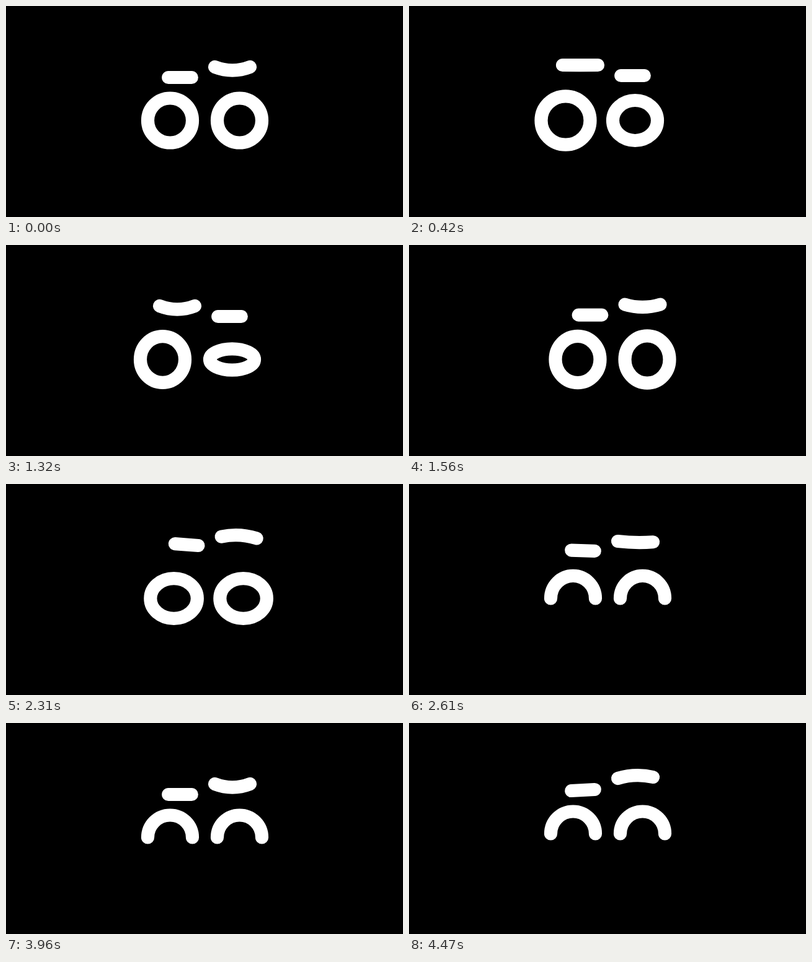
Animation, 640 px wide and 341 px high, one loop 4.5 s. Source, as an HTML page with a canvas:

```html
<!DOCTYPE html>
<html lang="en">
<head>
<meta charset="utf-8">
<title>Eyes</title>
<style>
  html, body { margin: 0; width: 100%; height: 100%; overflow: hidden; background: #000; }
  canvas { display: block; }
</style>
</head>
<body>
<canvas id="stage" width="640" height="341"></canvas>
<script>
const ctx = document.getElementById('stage').getContext('2d');
const LOOP = 4500, STEP = 30;
const RADIUS = 36;
const LOOK_LEFT = 255, LOOK_RIGHT = 1375, SMILE = 2400;
const LAG = 55; // the trailing eye blinks a little later

const mix = (a, b, k) => a + (b - a) * k;

// Eased 0 to 1 between two times
function ramp(t, from, to) {
  const u = Math.min(1, Math.max(0, (t - from) / (to - from)));
  return u * u * (3 - 2 * u);
}

const bump = (t, from, peak, to) => ramp(t, from, peak) * (1 - ramp(t, peak, to));

// Change in eye height: stretch, close, open, overshoot
function blink(t, shut) {
  const d = t - shut;
  return 2 * bump(d, -180, -110, -40)
    - 34 * bump(d, -120, 0, 150)
    + 3.5 * bump(d, 40, 150, 230);
}

function drawEye(x, y, rx, ry, smiling) {
  ctx.beginPath();
  ctx.ellipse(x, y, rx, ry, 0, smiling ? Math.PI : 0, Math.PI * 2);
  ctx.stroke();
}

function drawEyes(t, rise) {
  const x = -12 * ramp(t, 240, 390) + 19.5 * ramp(t, 1330, 1500) - 7.5 * ramp(t, 2260, 2440);
  const y = 185 - 6 * rise;
  const puff = 2 * bump(t, 30, 150, 270) + 5 * bump(t, 2250, SMILE, 2580);
  const leftPuff = 3.5 * bump(t, 290, 420, 560);
  const height = (left, right) =>
    RADIUS + blink(t, left) + blink(t, right) + blink(t, SMILE);
  const smiling = t >= SMILE;

  drawEye(264.5 + x, y, RADIUS + puff + leftPuff,
    height(LOOK_LEFT, LOOK_RIGHT + LAG), smiling);
  drawEye(376.5 + x, y, RADIUS + puff,
    height(LOOK_LEFT + LAG, LOOK_RIGHT), smiling);
}

// size runs from 0 (short, straight) to 1 (long, curved)
function drawBrow(x, size, pose) {
  const y = mix(115.5 - pose.shortLift, 98.5 - pose.longLift, size);
  const half = mix(18.75, 28.5, size);
  ctx.beginPath();
  ctx.moveTo(x - half, y - pose.tilt);
  ctx.quadraticCurveTo(x, y + 2 * pose.sag * size, x + half, y + pose.tilt);
  ctx.stroke();
}

function drawBrows(t, rise) {
  const leftHop = bump(t, 200, 410, 640);
  const rightHop = bump(t, 1340, 1510, 1680);
  const surprise = bump(t, 2040, 2320, 2860);
  const hop = 3 * (leftHop + rightHop);
  const pose = {
    shortLift: hop + 17.5 * surprise + 7 * rise,
    longLift: hop + 12 * surprise + 10 * rise,
    sag: 5.5 - 5.5 * leftHop - 1.5 * rightHop - 9.25 * (surprise + rise),
    tilt: 1.4 * surprise - rise
  };

  // Looking left swaps the long and short brow
  const swap = ramp(t, 180, 380) - ramp(t, 1340, 1510);
  const x = 11.5 * (ramp(t, 1340, 1510) - ramp(t, 2280, 2460)) - 4.5 * swap;
  drawBrow(280.5 + x, swap, pose);
  drawBrow(365 + x, 1 - swap, pose);
}

function draw(t) {
  ctx.fillStyle = '#000';
  ctx.fillRect(0, 0, 640, 341);
  ctx.strokeStyle = '#fff';
  ctx.lineCap = 'round';
  ctx.lineWidth = 21.2;

  const rise = ramp(t, 4230, 4470);
  drawEyes(t, rise);
  drawBrows(t, rise);
}

const start = performance.now();
function tick() {
  const t = (performance.now() - start) % LOOP;
  draw(Math.floor(t / STEP) * STEP);
  requestAnimationFrame(tick);
}
tick();
</script>
</body>
</html>
```
